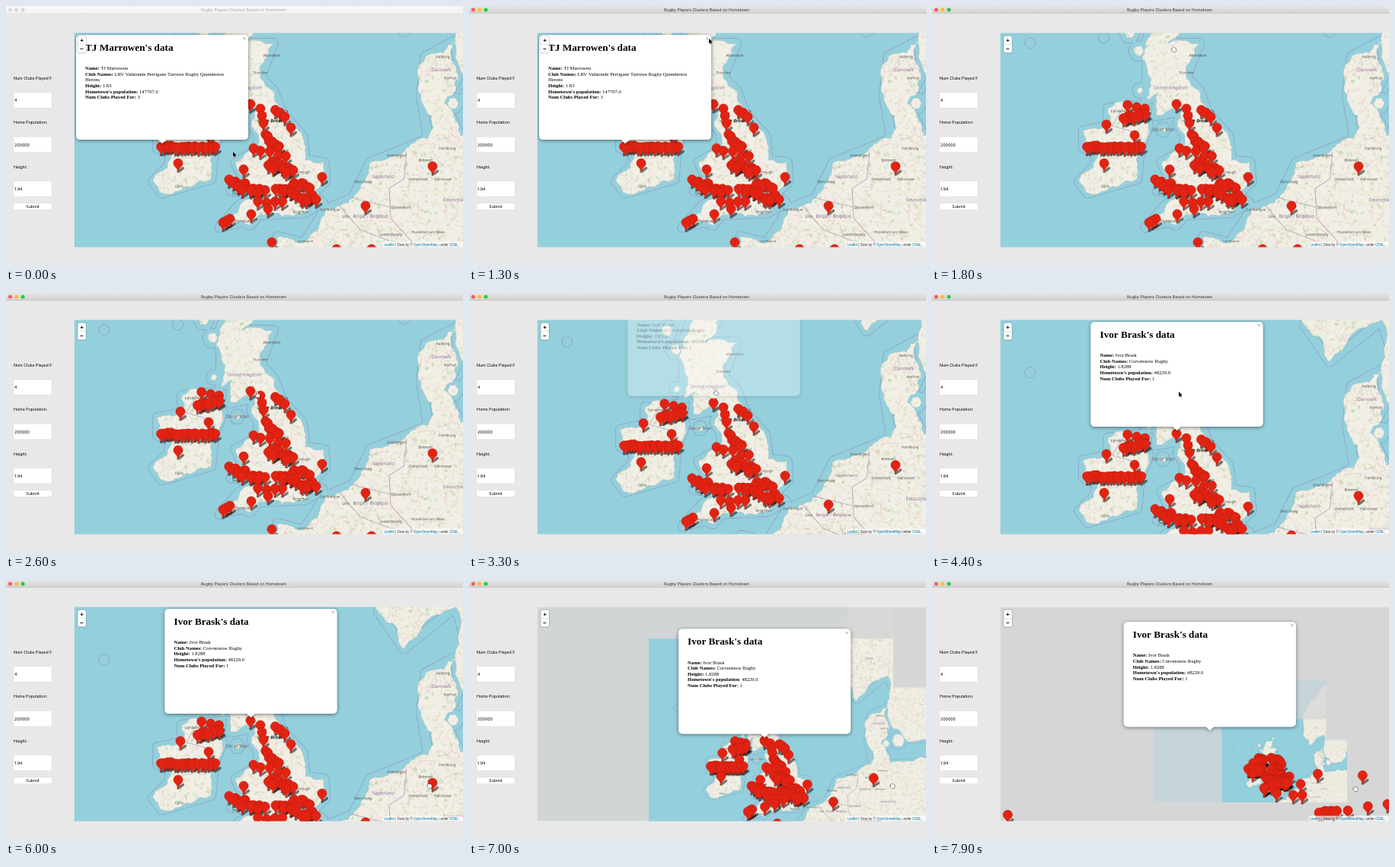
Recreate the animation shown at these times as an HTML page with a canvas. Size 600 by 341 pixels, loop 8000 ms.

```html
<!DOCTYPE html>
<html lang="en">
<head>
<meta charset="utf-8">
<title>Rugby Players Clusters Based on Hometown</title>
<style>
html, body { margin: 0; width: 100%; height: 100%; overflow: hidden; background: #e8e8e8; }
canvas { display: block; width: 600px; height: 341px; }
</style>
</head>
<body>
<canvas id="stage"></canvas>
<script>
const LOOP = 8000;
const UI = 'Inter, sans-serif';
const SANS = '"Liberation Sans", Arial, sans-serif';
const SERIF = '"Liberation Serif", "Times New Roman", serif';
const SEA = '#94cfdc', BORDER = '#8886b8', LINK = '#0078a8';
const MAP = { x: 89.8, y: 35.6, w: 510.2, h: 281.8 };
const TILE = 107;
const WORLD = { x: -280, y: -300, w: 990, h: 626, detail: 3 };
const ZOOM_POINT = { x: 488, y: 262 };

const canvas = document.getElementById('stage');
const ctx = canvas.getContext('2d');
const dpr = window.devicePixelRatio || 1;
canvas.width = 600 * dpr;
canvas.height = 341 * dpr;

let seed = 7;
const random = () => {
  seed = (seed * 1664525 + 1013904223) >>> 0;
  return seed / 4294967296;
};
const spread = r => (random() * 2 - 1) * r;
const clamp = v => Math.min(1, Math.max(0, v));
const span = (t, from, to) => clamp((t - from) / (to - from));
const smooth = u => u * u * (3 - 2 * u);
const lerp = (a, b, u) => a + (b - a) * u;

function text(c, str, x, y, size, color, { font = SANS, style = '', align = 'left' } = {}) {
  c.font = `${style} ${size}px ${font}`;
  c.fillStyle = color;
  c.textAlign = align;
  c.fillText(str, x, y);
  return c.measureText(str).width;
}

function box(x, y, w, h, r, fill, stroke, lineWidth = 0.5) {
  ctx.beginPath();
  ctx.roundRect(x, y, w, h, r);
  ctx.strokeStyle = stroke;
  ctx.lineWidth = lineWidth;
  ctx.stroke();
  ctx.fillStyle = fill;
  ctx.fill();
}

// ---- Map: a few longitude, latitude points per coast, roughened by midpoint displacement ----
const britain = [[-5.7,50.1], [-4.3,51.1], [-2.7,51.5], [-4.9,51.7], [-4.1,52.3], [-4.6,52.9], [-3.1,53.4], [-3,54],
  [-3.5,54.5], [-3.2,55], [-5,54.8], [-4.8,55.7], [-5.7,55.4], [-5.6,56.5], [-5.7,57.6], [-5,58.6], [-3.1,58.6],
  [-4.2,57.6], [-2,57.6], [-2.9,56.3], [-2,55.8], [-1.4,54.9], [0,54], [.2,53], [1.5,52.9], [1.6,52.1], [.6,51.5],
  [1.4,51.2], [.2,50.75], [-3,50.65], [-3.6,50.2], [-4.2,50.35]];
const ireland = [[-6.3,52.2], [-6.1,53.5], [-5.5,54.4], [-6.1,55.2], [-8.3,55.1], [-8.3,54.4], [-10,54.2], [-10,53.5],
  [-9,53.2], [-9.3,52.7], [-10.3,52.1], [-9.7,51.6], [-8,51.9]];
const continent = [[-1.5,48], [-1.7,49.7], [.1,49.4], [1.6,50.9], [3.5,51.4], [4.7,52.9], [7.2,53.5], [8.7,53.9],
  [8.2,55.6], [8.5,57.1], [10.6,57.7], [10.8,56.4], [9.8,55.3], [10.9,54], [18,54.3], [18,48]];
const scandinavia = [[12,66], [5,62], [5.3,59.3], [7,58], [10.6,59.5], [12.8,55.5], [14.3,55.5], [16.4,56.2], [18,58], [18,66]];
// Islands: longitude, latitude, radius in degrees
const islands = [[11.8,55.5,.7], [10.4,55.3,.4], [-6.8,58,.4], [-6.2,57.3,.35], [-6.1,55.8,.2], [-4.5,54.25,.18],
  [-3,59,.3], [-8.6,57.8,.02], [-13.68,57.6,.02]];
const frontiers = [[[7.2,53.3], [7,52.2], [6,51.8], [6.1,50.5], [8.2,49]], [[2.5,51.1], [4,50], [6,49.5]],
  [[3.4,51.4], [6,51]], [[-7.3,55.1], [-8,54.4], [-6.2,54.1]]];

function project([lon, lat]) {
  const mercator = Math.log(Math.tan(Math.PI / 4 + lat * Math.PI / 360)) * 180 / Math.PI;
  const perDegree = TILE / 5.625;
  return [389 + lon * perDegree, 219 + (61.875 - mercator) * perDegree];
}

function roughen([x1, y1], [x2, y2], amount, depth) {
  if (!depth) return [[x1, y1]];
  const shift = spread(amount);
  const middle = [(x1 + x2) / 2 + (y2 - y1) * shift, (y1 + y2) / 2 - (x2 - x1) * shift];
  return [...roughen([x1, y1], middle, amount, depth - 1), ...roughen(middle, [x2, y2], amount, depth - 1)];
}

function outline(points, amount = 0, closed = true) {
  const path = new Path2D();
  const corners = points.map(project);
  corners.forEach((corner, i) => {
    const next = corners[(i + 1) % corners.length];
    const line = amount ? roughen(corner, next, amount, 4) : [corner];
    line.forEach(point => path.lineTo(...point));
  });
  if (closed) path.closePath();
  return path;
}

const islandShape = ([lon, lat, r]) => Array.from({ length: 6 }, (_, i) =>
  [lon + r * Math.cos(i * Math.PI / 3), lat + 0.6 * r * Math.sin(i * Math.PI / 3)]);

const cities = [['Aberdeen', -2.1, 57.15], ['Dundee', -2.9, 56.5], ['Newcastle', -1.6, 55], ['Londonderry', -7.3, 55],
  ['Galway', -8.9, 53.3], ['Cork', -8.5, 51.9], ['Sheffield', -1.5, 53.4], ['Peterborough', -.3, 52.5],
  ['Swansea', -4.3, 51.6], ['Plymouth', -4.1, 50.4], ['Brighton', -.1, 50.8], ['Dunkerque', 1.9, 50.9],
  ['Lille', 3, 50.6], ['Groningen', 6.5, 53.2], ['Aalborg', 9.7, 57.1], ['Aarhus', 10.2, 56.3], ['Hamburg', 10, 53.5],
  ['Bremen', 8.5, 53], ['Hannover', 9.7, 52.2], ['Osnabrück', 8, 52.2], ['Den Haag', 4.2, 52.1],
  ['Düsseldorf', 6.8, 51], ['Luxembourg', 6.1, 49.8], ['Frankfurt am Main', 8.7, 49.9], ['Le Havre', .2, 49.5]];
const regions = [['United Kingdom', -4, 55.9], ['Danmark', 9.6, 56.6], ['Nederland', 5.6, 52.3],
  ['Deutschland', 10.6, 51.3], ['België / Belgique', 4.7, 50.6], ['Norge', 8.5, 60.5]];

function paintLand(c, land) {
  const anywhere = () => [180 + random() * 530, -120 + random() * 446];
  const tones = ['#bfdcab', '#dcebcf', '#a9d193', '#faf7f0', '#e2dccb', '#cfe6c0', '#d6d3cd'];
  c.fillStyle = '#f1eee5';
  c.fill(land);
  c.save();
  c.clip(land);
  for (let i = 0; i < 7000; i++) {
    c.globalAlpha = 0.3 + random() * 0.35;
    c.fillStyle = tones[i % tones.length];
    c.beginPath();
    c.ellipse(...anywhere(), 0.6 + random() * 2.6, 0.5 + random() * 1.5, random() * 3, 0, 7);
    c.fill();
  }
  c.lineWidth = 0.4;
  c.globalAlpha = 0.65;
  for (let i = 0; i < 1500; i++) {
    const [x, y] = anywhere();
    if (y < 120 && x < 450) continue;
    c.strokeStyle = i % 3 ? '#dc9a9f' : '#ecbd85';
    c.beginPath();
    c.moveTo(x, y);
    c.quadraticCurveTo(x + spread(8), y + spread(8), x + spread(16), y + spread(14));
    c.stroke();
  }
  c.restore();
  c.lineWidth = 0.3;
  c.strokeStyle = '#a9b3b0';
  c.stroke(land);
}

function paintWorld() {
  const world = document.createElement('canvas');
  world.width = WORLD.w * WORLD.detail;
  world.height = WORLD.h * WORLD.detail;
  const c = world.getContext('2d');
  c.scale(WORLD.detail, WORLD.detail);
  c.translate(-WORLD.x, -WORLD.y);
  c.fillStyle = SEA;
  c.fillRect(WORLD.x, WORLD.y, WORLD.w, WORLD.h);
  c.lineJoin = 'round';
  const coasts = [britain, ireland, continent, scandinavia, ...islands.map(islandShape)];

  // Territorial waters: a thin line at a fixed distance from every coast.
  for (const [width, color] of [[13.6, BORDER], [12.6, SEA]]) {
    c.lineWidth = width;
    c.strokeStyle = color;
    coasts.forEach(coast => c.stroke(outline(coast)));
  }
  const land = new Path2D();
  coasts.forEach(coast => land.addPath(outline(coast, 0.17)));
  paintLand(c, land);

  c.lineWidth = 0.7;
  c.strokeStyle = '#a98eb4';
  frontiers.forEach(line => c.stroke(outline(line, 0, false)));
  const label = ([name, ...place], size, color, style) => {
    const [x, y] = project(place);
    text(c, name, x, y + 2, size, color, { font: '"Noto Sans", sans-serif', align: 'center', style });
  };
  cities.forEach(city => label(city, 5, '#4c4c48'));
  regions.forEach(region => label(region, 5.8, '#8f6f9a'));
  label(['Isle of Man', -4.5, 54.25], 5.8, '#66666c');
  label(['Great Britain', -2.15, 54.6], 5.8, '#2f2f2c', 'italic bold');
  return world;
}
const world = paintWorld();

// ---- Pins: centres of the heads ----
const PIN_TIP = 11;
const pins = [[229,156], [266,170], [226,207], [321,129], [374,160], [312,215], [415,225], [344,267], [322,274],
  [349,311], [472,263], [560,211], [434,320], [480,320], [790,219], [-1030,422]];

function pinRow([x1, y1], [x2, y2], count, scatter) {
  for (let i = 0; i < count; i++) {
    const u = i / (count - 1);
    pins.push([lerp(x1, x2, u) + spread(scatter / 2), lerp(y1, y2, u) + spread(scatter)]);
  }
}
pinRow([204, 185], [275, 185], 17, 1.2);
pinRow([257, 130], [280, 136], 3, 1);
pinRow([251, 148], [282, 142], 9, 4);
pinRow([334, 135], [338, 154], 3, 0);
pinRow([354, 136], [366, 146], 3, 1);
pinRow([340, 171], [357, 188], 9, 4);
pinRow([324, 188], [368, 198], 5, 2);
pinRow([344, 207], [376, 218], 13, 5);
pinRow([295, 233], [338, 243], 15, 5);
pinRow([331, 257], [363, 259], 4, 2);
pinRow([375, 235], [399, 237], 7, 3);
pinRow([356, 243], [406, 254], 16, 5);
pinRow([285, 285], [294, 280], 3, 0);
pinRow([570, 406], [655, 404], 7, 8);
pinRow([716, 402], [919, 378], 3, 12);
pins.sort((a, b) => a[1] - b[1]);

function drawPinShadow([x, y]) {
  ctx.beginPath();
  ctx.moveTo(x, y);
  ctx.lineTo(x + 6.5, y - 4.5);
  ctx.stroke();
}

function drawPin([x, y]) {
  const cy = y - PIN_TIP;
  ctx.beginPath();
  ctx.moveTo(x, y);
  ctx.quadraticCurveTo(x - 1.2, cy + 6.5, x - 4.9, cy + 3.6);
  ctx.arc(x, cy, 6.1, Math.PI * 0.8, Math.PI * 0.2);
  ctx.quadraticCurveTo(x + 1.2, cy + 6.5, x, y);
  ctx.fill();
  ctx.stroke();
}

// ---- Popups ----
const firstPopup = { x: 205, y: 196, title: "TJ Marrowen's data", rows: [
  ['Name:', 'TJ Marrowen'], ['Club Names:', 'LRV Valmonde Perrigane Tarrowe Rugby Quenderton'], ['', 'Herons'],
  ['Height:', '1.83'], ["Hometown's population:", '147707.0'], ['Num Clubs Played For:', '3']] };
const secondPopup = { x: 321.5, y: 140, title: "Ivor Brask's data", rows: [
  ['Name:', 'Ivor Brask'], ['Club Names:', 'Corvenstow Rugby'], ['Height:', '1.8288'],
  ["Hometown's population:", '48229.0'], ['Num Clubs Played For:', '1']] };

function drawPopup(popup, place, alpha) {
  if (alpha <= 0) return;
  const [cx, tip] = place(popup.x, popup.y);
  const left = cx - 113, top = tip - 158, bottom = top + 138;
  const shape = new Path2D();
  shape.roundRect(left, top, 226, 138, 5);
  shape.moveTo(cx + 5, bottom);
  shape.lineTo(cx, bottom + 5);
  shape.lineTo(cx - 5, bottom);
  const outside = new Path2D(shape);
  outside.rect(0, 0, 600, 341);

  ctx.save();
  ctx.globalAlpha = alpha;
  ctx.fillStyle = '#fff';
  // The shadow stays outside, so that a fading popup lets the map through.
  ctx.save();
  ctx.clip(outside, 'evenodd');
  ctx.shadowColor = 'rgba(0,0,0,.5)';
  ctx.shadowBlur = 5 * dpr;
  ctx.shadowOffsetY = dpr;
  ctx.fill(shape);
  ctx.restore();
  ctx.fill(shape);

  text(ctx, popup.title, left + 12, top + 21, 13.2, '#000', { font: SERIF, style: 'bold' });
  popup.rows.forEach(([label, value], i) => {
    const y = top + 46.3 + i * 7.55;
    const width = label ? text(ctx, label + ' ', left + 12, y, 6.6, '#000', { font: SERIF, style: 'bold' }) : 0;
    text(ctx, value, left + 12 + width, y, 6.6, '#000', { font: SERIF });
  });
  text(ctx, '×', left + 221, top + 7.3, 7.5, '#b5b5b5', { style: 'bold', align: 'center' });
  ctx.restore();
}

// ---- Window ----
function drawWindow(active) {
  ctx.fillStyle = '#e8e8e8';
  ctx.fillRect(0, 0, 600, 341);
  const bar = ctx.createLinearGradient(0, 0, 0, 10);
  bar.addColorStop(0, active ? '#e6e6e6' : '#f6f6f6');
  bar.addColorStop(1, active ? '#d0d0d0' : '#f5f5f5');
  ctx.fillStyle = bar;
  ctx.fillRect(0, 0, 600, 10);
  ctx.fillStyle = active ? '#bcbcbc' : '#dcdcdc';
  ctx.fillRect(0, 9.5, 600, 0.5);
  ['#fc5b57', '#fdbc2e', '#28c840'].forEach((color, i) => {
    ctx.fillStyle = active ? color : '#d8d8d8';
    ctx.beginPath();
    ctx.arc(5.5 + i * 8.3, 5, 2.5, 0, 7);
    ctx.fill();
  });
  text(ctx, 'Rugby Players Clusters Based on Hometown', 312, 7, 5.35, active ? '#333' : '#a5a5a5', { font: UI, align: 'center' });

  [['Num Clubs Played F', '4'], ['Home Population:', '200000'], ['Height:', '1.94']].forEach(([label, value], i) => {
    const y = 97 + i * 58.4;
    text(ctx, label, 10, y, 5.3, '#000', { font: UI });
    box(10, y + 17, 50, 20, 0, '#fff', '#c9c9c9');
    text(ctx, value, 11, y + 29.2, 5.3, '#000', { font: UI });
  });
  box(10, 260, 50, 8, 1.5, '#fff', '#cfcfcf');
  text(ctx, 'Submit', 35, 266, 5.3, '#000', { font: UI, align: 'center' });
}

function drawControls() {
  box(94.3, 39.6, 10.6, 22, 1.5, '#fff', 'rgba(0,0,0,.22)', 1.6);
  ctx.fillStyle = '#ccc';
  ctx.fillRect(94.3, 50.4, 10.6, 0.5);
  const style = { style: 'bold', align: 'center' };
  text(ctx, '+', 99.6, 47.8, 8, '#000', style);
  text(ctx, '−', 99.6, 59, 8, '#000', style);

  ctx.fillStyle = 'rgba(255,255,255,.72)';
  ctx.fillRect(495, 310.5, 105, 7);
  let x = 496.5;
  [['Leaflet', LINK], [' | Data by © ', '#333'], ['OpenStreetMap', LINK], [', under ', '#333'], ['ODbL', LINK], ['.', '#333']]
    .forEach(([part, color]) => x += text(ctx, part, x, 315.6, 4.5, color));
}

// ---- Cursor ----
const arrow = new Path2D('M0 0V6.6L1.6 5.2L2.7 7.6L3.7 7.1L2.7 4.8L4.7 4.6Z');
const finger = new Path2D('M-.8 -2.6Q0 -3.6 .7 -2.6V0L3 .6Q3.6 1 3.2 2.4L2.4 4.4H-1L-3 1.4Q-2.6 .4 -.8 1.5Z');
const openHand = new Path2D('M-2 -1.6Q-1.4 -2.8 -.6 -2Q.2 -3.2 .9 -2Q2 -2.6 2.2 -1.2Q3.4 -1.2 3.1 .4L2.2 3.2H-1.2L-3.2 .4Q-2.8 -.4 -1.9 .2Z');

function drawCursor(x, y, shape) {
  ctx.save();
  ctx.translate(x, y);
  ctx.lineWidth = 0.8;
  ctx.strokeStyle = shape === arrow ? '#fff' : '#000';
  ctx.fillStyle = shape === arrow ? '#000' : '#fff';
  ctx.stroke(shape);
  ctx.fill(shape);
  ctx.restore();
}

const moves = [
  { from: 500, to: 1050, x: 315, y: 43 },
  { from: 1600, to: 2400, x: 330, y: 133 },
  { from: 2700, to: 3000, x: 324, y: 130 },
  { from: 5000, to: 5700, x: 556, y: 271 },
  { from: 7100, to: 7600, x: 556, y: 275 }];

const cursorAt = t => moves.reduce(([x, y], move) => {
  const u = smooth(span(t, move.from, move.to));
  return [lerp(x, move.x, u), lerp(y, move.y, u)];
}, [298, 192]);

function cursorShape(t, x, y) {
  if (t < 1700) return arrow;
  if (t < 2300) return openHand;
  if (t < 3600) return finger;
  return x < 434 && y < 176 ? arrow : openHand;
}

// ---- Map view ----
function drawTiles(scale, pan, fade) {
  const region = (alpha, ...rects) => {
    ctx.save();
    ctx.globalAlpha = alpha;
    ctx.translate(ZOOM_POINT.x, ZOOM_POINT.y);
    ctx.scale(scale, scale);
    ctx.translate(-ZOOM_POINT.x, pan - ZOOM_POINT.y);
    ctx.beginPath();
    rects.forEach(rect => ctx.rect(...rect));
    ctx.clip();
    ctx.drawImage(world, WORLD.x, WORLD.y, WORLD.w, WORLD.h);
    ctx.restore();
  };
  if (fade > 0) region(fade, [WORLD.x, WORLD.y, 603 - WORLD.x, WORLD.h]);
  region(1, [68, -102, 5 * TILE, 4 * TILE], [603, -102 + TILE, TILE, 3 * TILE]);
}

function draw(t) {
  const pan = 56 * smooth(span(t, 3100, 3680));
  const scale = Math.pow(0.256, smooth(span(t, 6600, 7564)));
  const popupScale = t < 7000 ? scale : lerp(0.6, 0.74, smooth(span(t, 7000, 7560)));
  const placeAt = s => (x, y) => [
    ZOOM_POINT.x + (x - ZOOM_POINT.x) * s,
    ZOOM_POINT.y + (y + pan - ZOOM_POINT.y) * s];
  const place = placeAt(scale);

  ctx.setTransform(dpr, 0, 0, dpr, 0, 0);
  ctx.imageSmoothingQuality = 'high';
  drawWindow(t >= 1100);

  ctx.save();
  ctx.beginPath();
  ctx.rect(MAP.x, MAP.y, MAP.w, MAP.h);
  ctx.clip();
  ctx.fillStyle = '#d6d6d6';
  ctx.fillRect(MAP.x, MAP.y, MAP.w, MAP.h);
  drawTiles(scale, pan, 0.25 * span(t, 6700, 7600));

  const tips = pins.map(([x, y]) => place(x, y + PIN_TIP));
  ctx.lineCap = 'round';
  ctx.lineWidth = 3.4;
  ctx.strokeStyle = 'rgba(0,0,0,.5)';
  tips.forEach(drawPinShadow);
  ctx.lineWidth = 0.5;
  ctx.strokeStyle = '#b81a0c';
  ctx.fillStyle = '#e22313';
  tips.forEach(drawPin);

  drawPopup(firstPopup, place, 1 - span(t, 1400, 1650));
  drawPopup(secondPopup, placeAt(popupScale), span(t, 3150, 3650));
  drawControls();
  ctx.restore();

  const [x, y] = cursorAt(t);
  drawCursor(x, y, cursorShape(t, x, y));
}

const start = performance.now();
function tick() {
  draw((performance.now() - start) % LOOP);
  requestAnimationFrame(tick);
}
tick();
</script>
</body>
</html>
```
